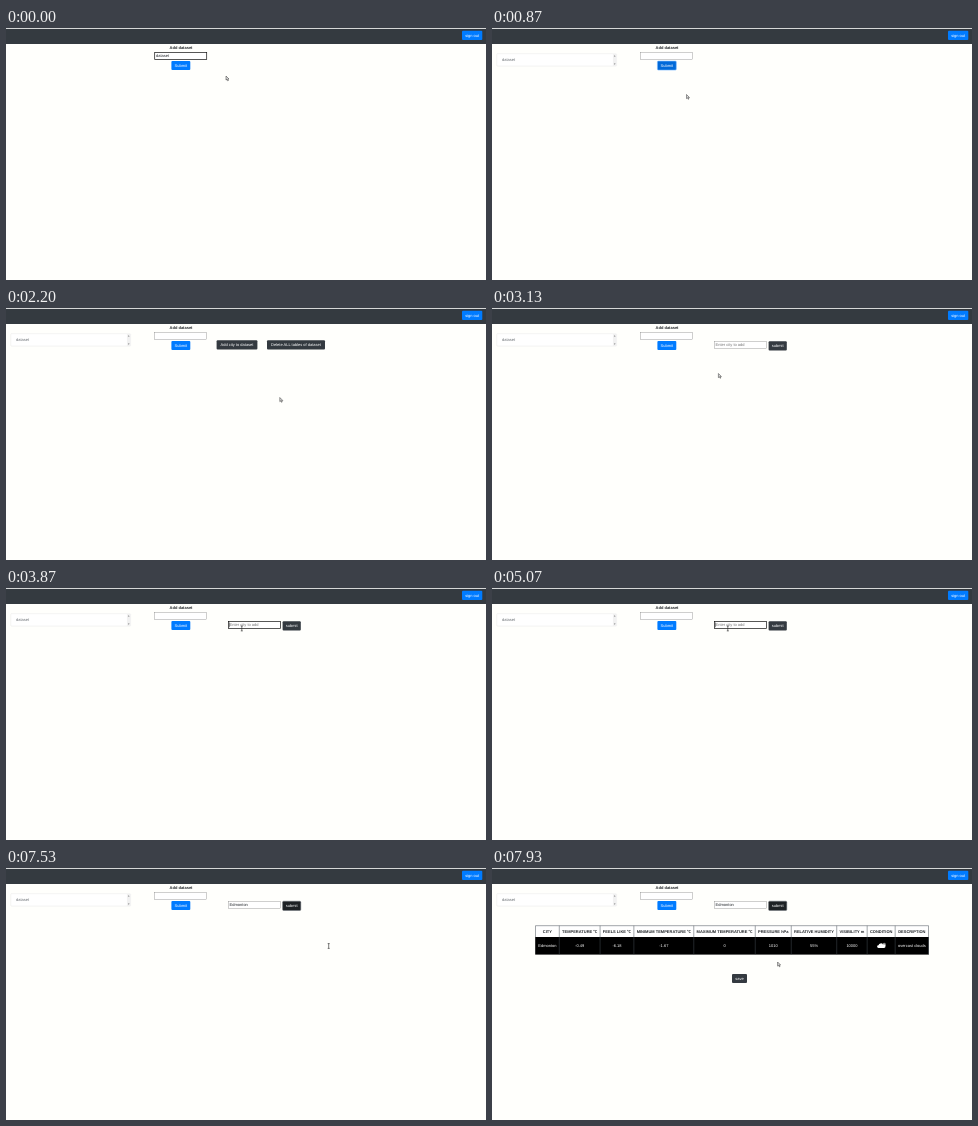
These frames come from a looping animation (480x252 px, 8000 ms). An HTML page:

```html
<!DOCTYPE html>
<html lang="en">
<head>
<meta charset="utf-8">
<title>Dataset dashboard</title>
<style>
html, body { margin: 0; width: 100%; height: 100%; overflow: hidden; background: #fffffc; }
svg { display: block; width: 100%; height: 100%; }
text { font: 4px "Liberation Sans", Arial, "Noto Sans CJK SC", sans-serif; fill: #212529; text-rendering: geometricPrecision; }
.bold { font-weight: bold; }
.mid { text-anchor: middle; }
.white { fill: #fff; }
.soft { fill: #6a6f74; }
.hint { fill: #757575; }
.blue { fill: #007bff; }
.dark { fill: #343a40; }
.blue.hot { fill: #0069d9; stroke: #80bdff; stroke-width: .6; }
.dark.hot { fill: #1d2124; stroke: #6c7378; stroke-width: .5; }
.field { fill: #fff; stroke: #767676; stroke-width: .35; }
.field.focus { stroke: #101010; stroke-width: .7; }
</style>
</head>
<body>
<svg viewBox="0 0 480 252" preserveAspectRatio="none"></svg>
<script>
const LOOP = 8000, STEP = 200 / 3;
const svg = document.querySelector('svg');

const rect = (x, y, w, h, attrs) => `<rect x="${x}" y="${y}" width="${w}" height="${h}" ${attrs}/>`;
const text = (x, y, str, cls = '', id = '') => `<text x="${x}" y="${y}" class="${cls}" id="${id}">${str}</text>`;
const group = (id, body) => `<g id="${id}">${body}</g>`;
const button = (id, x, y, w, h, label, cls) =>
  rect(x, y, w, h, `rx="1" class="${cls}" id="${id}"`) + text(x + w / 2, y + h / 2 + 1.4, label, 'mid white');

const pen = document.createElement('canvas').getContext('2d');
function textWidth(str, weight = '') {
  pen.font = `${weight} 40px "Liberation Sans", Arial, "Noto Sans CJK SC", sans-serif`;
  return pen.measureText(str).width / 10;
}

// columns fit their widest text and share the spare width as padding
function table() {
  const left = 43.5, width = 393;
  const columns = Object.entries({
    'CITY': 'Edmonton', 'TEMPERATURE ℃': '-0.49', 'FEELS LIKE ℃': '-6.18',
    'MINIMUM TEMPERATURE ℃': '-1.67', 'MAXIMUM TEMPERATURE ℃': '0', 'PRESSURE hPa': '1010',
    'RELATIVE HUMIDITY': '55%', 'VISIBILITY m': '10000', 'CONDITION': '', 'DESCRIPTION': 'overcast clouds'
  });
  const widths = columns.map(([head, cell]) => Math.max(textWidth(head, 'bold'), textWidth(cell)));
  const pad = (width - widths.reduce((a, b) => a + b)) / columns.length;
  let x = left, lines = `M${left} 57.7V69`, labels = '';
  columns.forEach(([head, cell], i) => {
    const w = widths[i] + pad, mid = x + w / 2;
    labels += text(mid, 64.7, head, 'bold mid') + text(mid, 79.2, cell, 'mid white');
    x += w;
    lines += `M${x} 57.7V86.5`;
  });
  return rect(left, 57.7, width, 11.3, 'fill="#fff"') + rect(left - .3, 69, width + .6, 17.6, 'fill="#000"') +
    `<path d="${lines}M${left} 57.7h${width}" stroke="#454d55" stroke-width=".5"/>` + labels +
    `<path d="M390.5 75.8q1.8-2 3.3 0q.8 2.2-1 3z" fill="#888"/>
     <path d="M386.5 80a1.4 1.4 0 0 1 0-2.8a2.5 2.5 0 0 1 4.5-.7a1.8 1.8 0 0 1 1.2 3.5z" fill="#fff"/>` +
    button('save', 240, 105.9, 15, 9.2, 'save', 'dark');
}

svg.innerHTML =
  rect(0, .8, 480, 15.2, 'class="dark"') +
  button('signOut', 456, 2.8, 20.3, 9.3, 'sign out', 'blue') +
  text(175, 21.4, 'Add dataset', 'bold mid') +
  rect(148.7, 24.5, 52, 6.9, 'class="field" id="nameField"') +
  text(150, 29.4, 'dataset', '', 'nameText') +
  button('add', 165.4, 33.1, 18.9, 9, 'Submit', 'blue') +
  group('list', rect(4.8, 25.7, 119.8, 12.4, 'rx=".8" fill="#fff" stroke="#e3e3e3" stroke-width=".4"') +
    text(10, 33.3, 'dataset', 'soft') + rect(120.9, 25.9, 3.6, 12, 'fill="#f1f1f1"') +
    '<path d="M121.8 28.4l.9-1.1l.9 1.1zM121.8 35.6l.9 1.1l.9-1.1z" fill="#777"/>') +
  group('actions', button('addCity', 210.6, 32.2, 40.8, 9.3, 'Add city to dataset', 'dark') +
    button('wipe', 261, 32.2, 58, 9.3, 'Delete ALL tables of dataset', 'dark')) +
  group('form', rect(222.4, 33.5, 52, 7, 'class="field" id="cityField"') +
    text(223.6, 38.3, '', '', 'cityText') +
    rect(223.4, 34.4, .4, 4.8, 'id="caret"') +
    button('send', 276.6, 33.2, 18.2, 9.3, 'submit', 'dark')) +
  group('weather', table()) +
  group('cursor',
    '<path id="arrow" d="M0 0V4.1L1 3.3L1.7 4.8L2.4 4.5L1.8 3H3z" fill="#ddd" stroke="#333" stroke-width=".5"/>' +
    '<path id="beam" d="M-1-2.4H1M0-2.4V2.4M-1 2.4H1" stroke="#222" stroke-width=".6"/>' +
    '<path id="hand" d="M-.4 0H.4V1.7L2.2 2.2V3.8L1.6 5H-.6L-1.6 3.2L-1.2 2.6L-.4 3z" fill="#fff" stroke="#222" stroke-width=".4"/>');

const el = id => document.getElementById(id);
const show = (id, on) => el(id).style.display = on ? '' : 'none';
const mark = (id, cls, on) => el(id).classList.toggle(cls, on);

// pointer moves: start, end, x, y, sag of the arc
const moves = [
  [0, 533, 175, 38, 0],
  [600, 867, 194.5, 66.5, 0],
  [867, 1533, 75.5, 36, 12],
  [1667, 2200, 273.8, 89.5, 80],
  [2200, 2867, 231, 38, 8],
  [2867, 3133, 226.4, 65.5, 0],
  [3133, 3600, 235.8, 40.5, 0],
  [6267, 6733, 282, 38, -16],
  [6867, 7533, 322.7, 78, 0],
  [7600, 7933, 285.6, 94, 0]
];

function pointer(t) {
  let x = 220, y = 48;
  for (const [start, end, toX, toY, sag] of moves) {
    const k = Math.min(1, Math.max(0, (t - start) / (end - start)));
    const ease = k * k * (3 - 2 * k);
    x += (toX - x) * ease;
    y += (toY - y) * ease + sag * Math.sin(Math.PI * ease);
  }
  return [x, y];
}

function draw(t) {
  const within = (a, b) => t >= a - 5 && t < b - 5;
  const from = a => within(a, LOOP + 10);
  const [x, y] = pointer(t);
  const over = (l, r) => x > l && x < r && y > 32.5 && y < 42.5;

  mark('nameField', 'focus', within(0, 467));
  show('nameText', within(0, 600));
  mark('add', 'hot', over(165, 185) || within(467, 1733));
  show('list', from(667));

  show('actions', within(1867, 2933));
  mark('addCity', 'hot', over(210, 252));

  // the first letter, a pause, then an even run
  const typed = from(5400) ? Math.min(8, 2 + Math.floor((t - 5395) / 88)) : +from(5133);
  show('form', from(2933));
  mark('cityField', 'focus', within(3867, 6867));
  el('cityText').textContent = typed ? 'Edmonton'.slice(0, typed) : 'Enter city to add';
  mark('cityText', 'hint', !typed);
  show('caret', within(3867, 4467) || within(5067, 6533));
  el('caret').setAttribute('x', 223.4 + textWidth('Edmonton'.slice(0, typed)));
  mark('send', 'hot', from(2933) && over(276, 295) || from(6867));
  show('weather', from(7667));

  const beam = within(3533, 6400) || within(7467, 7867);
  const hand = !beam && (over(165, 185) || within(1867, 2933) && over(210, 252) ||
    from(6400) && over(276, 295) || within(1467, 1800));
  show('beam', beam);
  show('hand', hand);
  show('arrow', !hand && !beam);
  el('cursor').setAttribute('transform', `translate(${x} ${y})`);
}

function tick() {
  const t = performance.now() % LOOP;
  draw(Math.floor((t + 4) / STEP) * STEP % LOOP);
  requestAnimationFrame(tick);
}
tick();
</script>
</body>
</html>
```
